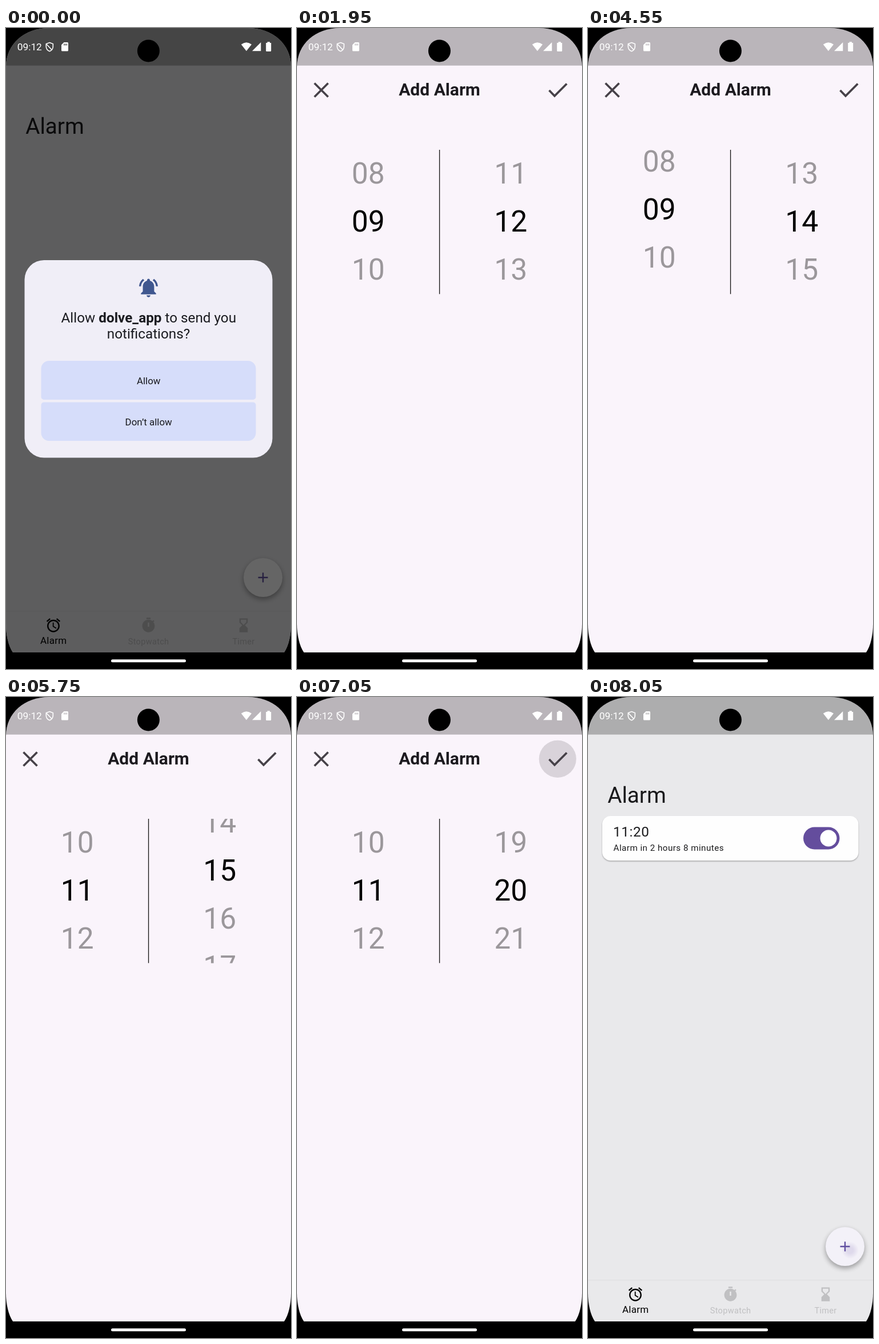
An HTML page that plays this animation: 499 px wide and 1121 px high, repeating every 8100 ms.

```html
<!DOCTYPE html>
<html lang="en">
<head>
<meta charset="utf-8">
<title>Alarm demo</title>
<style>
  html, body { margin: 0; width: 100%; height: 100%; overflow: hidden; background: #000; }
  svg { display: block; width: 100%; height: 100%; font-family: Roboto, sans-serif; }
  .mid { text-anchor: middle; }
  .wheel { font-size: 51.5px; text-anchor: middle; }
  .tab { font-size: 14.57px; letter-spacing: .3px; text-anchor: middle; }
</style>
</head>
<body>
<svg viewBox="0 0 499 1121">
  <defs>
    <clipPath id="screen">
      <path d="M0 68C0 28 32 0 76 0H423C467 0 499 28 499 68V1042C499 1062 495 1080 487 1092H12C4 1080 0 1062 0 1042Z"/>
    </clipPath>
    <clipPath id="window"><rect y="213" width="499" height="252.5"/></clipPath>
    <filter id="soft" x="-50%" y="-50%" width="200%" height="200%"><feGaussianBlur stdDeviation="4"/></filter>
    <filter id="thin" x="-5%" y="-20%" width="110%" height="140%"><feGaussianBlur stdDeviation="1.2"/></filter>
    <radialGradient id="blob">
      <stop offset=".35" stop-color="#6750a4" stop-opacity=".15"/>
      <stop offset="1" stop-color="#6750a4" stop-opacity="0"/>
    </radialGradient>
  </defs>

  <rect width="499" height="1121"/>
  <g clip-path="url(#screen)">
    <g id="list">
      <rect width="499" height="1092" fill="#e9e9eb"/>
      <text x="34.3" y="185" font-size="38.6" fill="#19191b">Alarm</text>

      <g id="card">
        <rect x="25" y="209.5" width="448.5" height="78" rx="14.5" opacity=".28" filter="url(#thin)"/>
        <rect x="25" y="208" width="448.5" height="78" rx="14.5" fill="#fefefe"/>
        <g fill="#1b1b1d">
          <text x="44" y="244" font-size="24.28" letter-spacing=".6">11:20</text>
          <text x="44.5" y="269" font-size="15.2" letter-spacing=".47">Alarm in 2 hours 8 minutes</text>
        </g>
        <rect x="377" y="227.5" width="63.5" height="39" rx="19.5" fill="#644d9d"/>
        <circle cx="421" cy="247" r="14.5" fill="#fff"/>
      </g>

      <circle cx="450" cy="965" r="34.5" opacity=".32" filter="url(#soft)"/>
      <circle cx="450" cy="961" r="34" fill="#fefefe"/>
      <circle id="press" cx="450" cy="961" r="34" fill="#6750a4"/>
      <circle id="ripple" cx="459" cy="967.5" fill="url(#blob)"/>
      <path d="M441.5 961H458.5M450 952.5V969.5" stroke="#6150a0" stroke-width="2.4"/>

      <rect y="1019" width="499" height="1.6" fill="#e2e2e4"/>
      <path transform="translate(68.4 1030) scale(1.214)" d="M22 5.72l-4.6-3.86-1.29 1.53 4.6 3.86L22 5.72zM7.88 3.39L6.6 1.86 2 5.71l1.29 1.53 4.59-3.85zM12.5 8H11v6l4.75 2.85.75-1.23-4-2.37V8zM12 4c-4.97 0-9 4.03-9 9s4.02 9 9 9c4.97 0 9-4.03 9-9s-4.03-9-9-9zm0 16c-3.87 0-7-3.13-7-7s3.13-7 7-7 7 3.13 7 7-3.13 7-7 7z"/>
      <text class="mid" x="83.2" y="1077" font-size="17" letter-spacing=".3">Alarm</text>
      <g fill="#c0c0c2">
        <path transform="translate(234.9 1030) scale(1.214)" d="M15 1H9v2h6V1zm4.03 6.39l1.42-1.42c-.43-.51-.9-.99-1.41-1.41l-1.42 1.42C16.07 4.74 14.12 4 12 4c-4.97 0-9 4.03-9 9s4.02 9 9 9 9-4.03 9-9c0-2.12-.74-4.07-1.97-5.61zM13 14h-2V8h2v6z"/>
        <text class="tab" x="249.6" y="1078">Stopwatch</text>
        <path transform="translate(401.4 1030) scale(1.214)" d="M18 22l-.01-6L14 12l3.99-4.01L18 2H6v6l4 4-4 3.99V22h12zM8 7.5V4h8v3.5l-4 4-4-4z"/>
        <text class="tab" x="416" y="1078">Timer</text>
      </g>
    </g>

    <g id="editor">
      <rect width="499" height="1092" fill="#faf4fb"/>
      <circle id="tap" cx="456.3" cy="108.3" r="32.6" fill="#d9d3da"/>
      <g fill="none" stroke="#464148" stroke-width="3.7">
        <path d="M30.5 96.5L54.5 120.5M54.5 96.5L30.5 120.5"/>
        <path d="M441.5 109L451 118.8L472.3 97.5"/>
      </g>
      <text class="mid" x="249.5" y="118" font-size="30" font-weight="700" fill="#1c1a1f">Add Alarm</text>
      <g clip-path="url(#window)">
        <g id="hours" class="wheel"></g>
        <g id="minutes" class="wheel"></g>
      </g>
      <rect x="248.9" y="213" width="1.3" height="252.3" fill="#111"/>
    </g>

    <rect width="499" height="65.7" opacity=".26"/>
    <rect id="scrim" width="499" height="1092"/>

    <g id="dialog">
      <rect x="32.5" y="406" width="434" height="345.5" rx="34" fill="#f0eef7"/>
      <path fill="#40578f" transform="translate(229.7 434.4) scale(1.65)" d="M7.58 4.08L6.15 2.65C3.75 4.48 2.17 7.3 2.03 10.5h2c.15-2.65 1.51-4.97 3.55-6.42zm12.39 6.42h2c-.15-3.2-1.73-6.02-4.12-7.85l-1.42 1.43c2.02 1.45 3.39 3.77 3.54 6.42zM18 11c0-3.07-1.64-5.64-4.5-6.32V4c0-.83-.67-1.5-1.5-1.5s-1.5.67-1.5 1.5v.68C7.63 5.36 6 7.92 6 11v5l-2 2v1h16v-1l-2-2v-5zm-6 11c.14 0 .27-.01.4-.04.65-.14 1.18-.58 1.44-1.18.1-.24.15-.5.15-.78h-4c.01 1.1.9 2 2.01 2z"/>
      <g fill="#d6ddfa">
        <path d="M61.5 596a14 14 0 0 1 14-14H423.5a14 14 0 0 1 14 14V645.2a4.8 4.8 0 0 1-4.8 4.8H66.3a4.8 4.8 0 0 1-4.8-4.8Z"/>
        <path d="M61.5 659.3a4.8 4.8 0 0 1 4.8-4.8H432.7a4.8 4.8 0 0 1 4.8 4.8V708a14 14 0 0 1-14 14H75.5a14 14 0 0 1-14-14Z"/>
      </g>
      <g class="mid" fill="#1a1b20" font-size="24.28">
        <text x="249.8" y="514.7">Allow <tspan font-weight="700">dolve_app</tspan> to send you</text>
        <text x="249.5" y="543.3">notifications?</text>
        <g font-size="16.9">
          <text x="249.7" y="622.5">Allow</text>
          <text x="249.7" y="695">Don’t allow</text>
        </g>
      </g>
    </g>

    <g fill="#fff">
      <text x="19.8" y="38.7" font-size="17.3">09:12</text>
      <path d="M76.3 25.6L82.3 27.8V32.5C82.3 36.5 79.8 39.3 76.3 40.7C72.8 39.3 70.3 36.5 70.3 32.5V27.8ZM71 28.5L80 38" fill="none" stroke="#fff" stroke-width="1.6"/>
      <path fill-rule="evenodd" d="M101.5 25H107.5Q109 25 109 26.5V39Q109 40.5 107.5 40.5H98.5Q97 40.5 97 39V29.5ZM101.2 27.5V30.5H102.5V27.5ZM103.5 27.5V30.5H104.8V27.5ZM105.8 27.5V30.5H107.1V27.5Z"/>
      <path d="M411.8 28.8Q420.9 21.8 430 28.8L420.9 40.3Z"/>
      <path d="M446.3 25V40.3H431Z"/>
      <path d="M457.5 24.3H462V26H464.2V39.8Q464.2 41 463 41H456.4Q455.2 41 455.2 39.8V26H457.5Z"/>
    </g>
    <circle cx="249.4" cy="40" r="19.5"/>
  </g>
  <rect x="184" y="1104.2" width="131" height="5" rx="2.5" fill="#fff"/>
</svg>
<script>
const LOOP = 8100, STEP = 50, ROW = 84;
const $ = id => document.getElementById(id);
const clamp = v => Math.min(1, Math.max(0, v));
const show = (id, on) => $(id).setAttribute('display', on ? 'inline' : 'none');
const fade = (id, v) => $(id).setAttribute('opacity', v);

// Each flick: start, end, value before, value after, ease-out power
const hourFlicks = [
  [3850, 4100, 9, 11, 3],
  [4250, 4750, 11, 9, 2.23],
  [5000, 5500, 9, 11, 2.23]
];
const minuteFlicks = [
  [3400, 3600, 12, 14, 7],
  [5600, 5950, 14, 16, 2.23],
  [6050, 6550, 16, 18, 2.23],
  [6650, 6950, 18, 20, 2.23]
];

function wheelAt(flicks, t) {
  let pos = flicks[0][2];
  for (const [start, end, from, to, power] of flicks) {
    if (t >= start) pos = from + (to - from) * (1 - (1 - clamp((t - start) / (end - start))) ** power);
  }
  return pos;
}

function makeWheel(id, x, count) {
  const rows = Array.from({ length: 5 }, () => {
    const row = document.createElementNS('http://www.w3.org/2000/svg', 'text');
    row.setAttribute('x', x);
    return $(id).appendChild(row);
  });
  return pos => {
    const picked = Math.round(pos);
    rows.forEach((row, i) => {
      const n = picked + i - 2;
      row.textContent = String((n + count) % count).padStart(2, '0');
      row.setAttribute('y', 356.3 + (n - pos) * ROW);
      row.setAttribute('fill-opacity', n === picked ? 1 : .38);
    });
  };
}

const setHours = makeWheel('hours', 124.7, 24);
const setMinutes = makeWheel('minutes', 374.2, 60);

function render(t) {
  const editing = t >= 1950 && t < 7300;
  show('editor', editing);
  show('list', !editing);
  show('card', t >= 7400);
  show('tap', t >= 7050);
  setHours(wheelAt(hourFlicks, t));
  setMinutes(wheelAt(minuteFlicks, t));

  fade('scrim', .6 * (1 - clamp(t / 250)));
  fade('dialog', 1 - clamp(t / 170));

  const press = clamp((t - 7900) / 150);
  fade('press', .07 * press);
  $('ripple').setAttribute('r', 15 * press);
}

function tick(now) {
  const t = now % LOOP;
  render(t - t % STEP);
  requestAnimationFrame(tick);
}
render(0);
requestAnimationFrame(tick);
</script>
</body>
</html>
```
